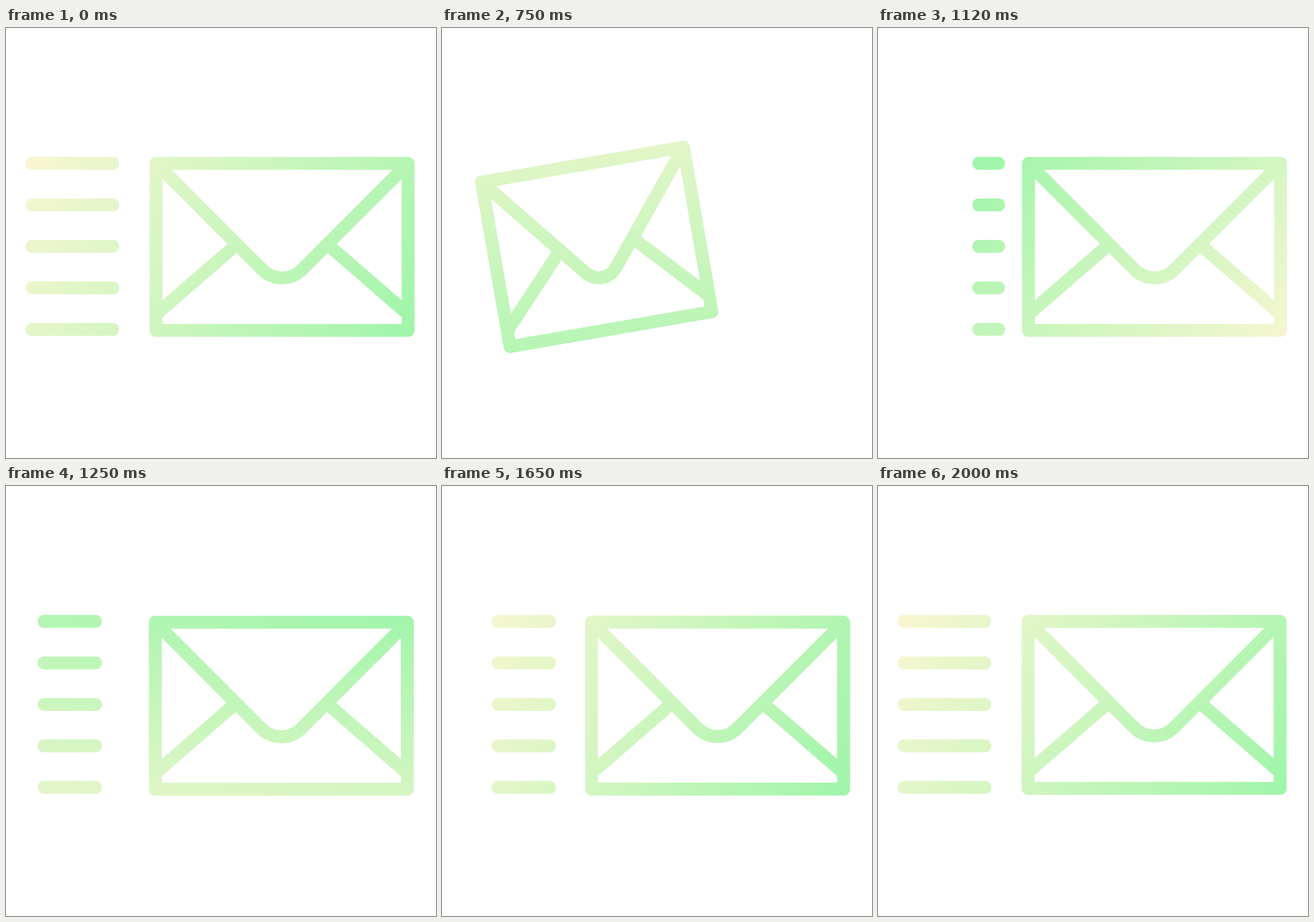
Write an HTML page with a canvas that moves like this. It is 748 px wide and 748 px high and loops after 2020 ms.

```html
<!DOCTYPE html>
<html lang="en">
<head>
<meta charset="utf-8">
<title>Flying envelope</title>
<style>
  html, body { margin: 0; height: 100%; overflow: hidden; background: #fff; }
  canvas { display: block; width: 748px; height: 748px; }
</style>
</head>
<body>
<canvas id="stage" width="748" height="748"></canvas>
<script>
const ctx = document.getElementById('stage').getContext('2d');
const LOOP = 2020, START = 520, END = 2000;
const HALF_W = 219.25, HALF_H = 145.25;
const TRACK = [27.25, 209.75], TRACK_LEN = 182.5;

const clamp = (v, lo = 0, hi = 1) => Math.min(hi, Math.max(lo, v));
const mix = (a, b, u) => a + (b - a) * u;
const span = (t, a, b) => clamp((t - a) / (b - a));
const easeOut = u => 1 - (1 - u) ** 2;
const easeSine = u => (1 - Math.cos(Math.PI * u)) / 2;

// Piecewise linear value; each key is [position, value]
function along(keys, x) {
  let i = 1;
  while (i < keys.length - 1 && x > keys[i][0]) i++;
  const [[x0, v0], [x1, v1]] = [keys[i - 1], keys[i]];
  return mix(v0, v1, span(x, x0, x1));
}

// One full turn of the two-colour gradient
function paint(t) {
  const p = easeSine(t < START ? 0 : span(t, 400, 1770));
  const angle = (33 + 360 * p) * Math.PI / 180;
  const x = along([[0, 374], [.408, 480], [.68, 374], [.894, 432], [1, 374]], p);
  const y = along([[0, 380], [.408, 380], [.68, 434], [.894, 380], [1, 380]], p);
  const half = along([[0, 727], [.408, 650], [.68, 540], [.894, 620], [1, 727]], p) / 2;
  const dx = Math.cos(angle) * half, dy = Math.sin(angle) * half;
  const g = ctx.createLinearGradient(x - dx, y - dy, x + dx, y + dy);
  g.addColorStop(0, '#f8f6d2');
  g.addColorStop(1, '#a0f5aa');
  return g;
}

// Ends of the dash, running left without wrapping
function dash(t) {
  if (t < START || t >= END) return [45.25, 185.75];
  if (t < 1050) {
    const u = easeOut(span(t, START, 740));
    return [mix(45.25, 33, u), mix(121.75, 33, u)];
  }
  if (t > 1820) {
    const u = easeOut(span(t, 1820, END));
    return [mix(-412.25, -502.25, u), mix(-322.75, -361.75, u)];
  }
  const a = along([[1080, 209.75], [1250, 67], [1470, -112.5], [1820, -412.25]], t);
  return [a, a + 89.5];
}

function drawLines(t) {
  const [a, b] = dash(t);
  ctx.beginPath();
  for (let k = 0; k < 4; k++) {
    const x0 = clamp(a + k * TRACK_LEN, ...TRACK);
    const x1 = clamp(b + k * TRACK_LEN, ...TRACK);
    if (x1 - x0 < .5) continue;
    for (let row = 0; row < 5; row++) {
      const y = 235.6 + row * 72.15;
      ctx.moveTo(x0, y);
      ctx.lineTo(x1, y);
    }
  }
  ctx.stroke();
}

// 0 at rest, 1 fully drawn back and tilted
function pull(t) {
  if (t < START) return 0;
  return t < 940 ? mix(.4, 1, easeOut(span(t, START, 800)))
                 : 1 - span(t, 940, 1031) ** 3;
}

function drawEnvelope(t) {
  const q = pull(t);
  const sway = span(t, 1030, 1100) * (1 - span(t, 1820, 1960));
  const wave = Math.cos((t - 1250) * 2 * Math.PI / 360);
  ctx.save();
  ctx.translate(480.25 - 215 * q - 1.3 * wave * sway,
                380.75 + Math.max(0, 1.6 * wave) * sway);
  ctx.rotate(-q * Math.PI / 18);
  ctx.scale(1 - .1907 * q, 1);
  ctx.beginPath();
  ctx.rect(-HALF_W, -HALF_H, 2 * HALF_W, 2 * HALF_H);
  ctx.moveTo(-HALF_W, -HALF_H);
  ctx.arc(0, 5.1, 48.8, Math.PI * .75, Math.PI * .25, true);
  ctx.lineTo(HALF_W, -HALF_H);
  for (const side of [-1, 1]) {
    ctx.moveTo(side * 84, 0);
    ctx.lineTo(side * HALF_W, 117.3);
  }
  ctx.restore();
  ctx.stroke();
}

ctx.lineWidth = 22.5;
ctx.lineCap = ctx.lineJoin = 'round';

const begin = performance.now();
function frame() {
  const t = (performance.now() - begin) % LOOP;
  ctx.clearRect(0, 0, 748, 748);
  ctx.strokeStyle = paint(t);
  drawLines(t);
  drawEnvelope(t);
  requestAnimationFrame(frame);
}
frame();
</script>
</body>
</html>
```
